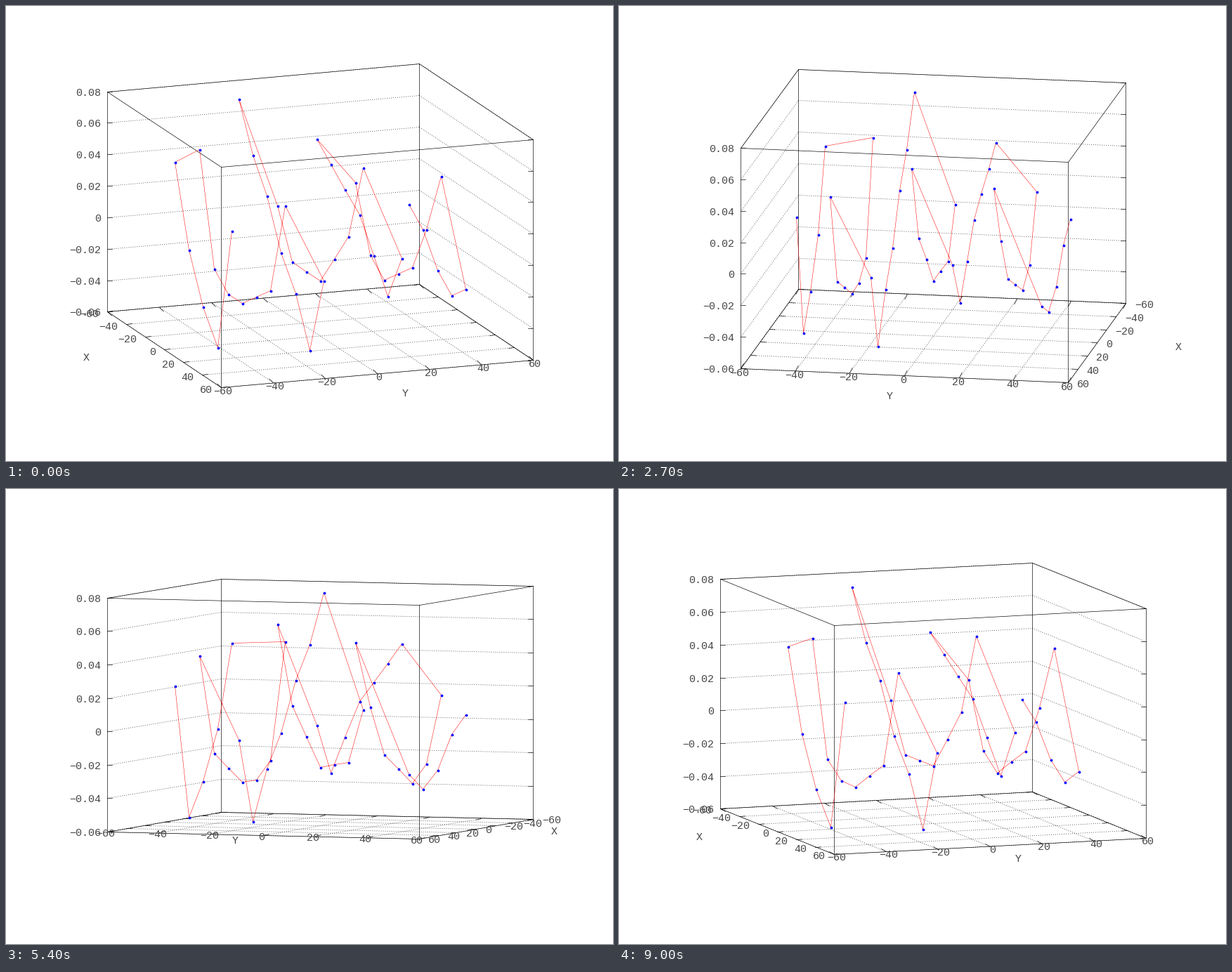
A matplotlib script that plays this animation: 864x648 px, repeating every 9900 ms.

```python
import numpy as np
import matplotlib.pyplot as plt
from matplotlib.animation import FuncAnimation

W, H, DPI = 864, 648, 100
PT = 72 / DPI                       # points per pixel
CX, CY = 447, 312.6                 # centre of the cube on stage
SX, SY = 236.4, 167                 # half sizes of the cube in pixels
EM = 15                             # font size in pixels
ADV = 0.6 * EM                      # advance of one character

# Camera stops: step, tilt and turn in degrees.
STOPS = [(0, 70, 70), (4, 70, 110), (6, 85, 110),
         (7, 85, 90), (9, 85, 70), (11, 70, 70)]
STEPS = STOPS[-1][0]

# One sweep per row: first, lowest and last height, bend of the fall.
SWEEPS = [(5, -35, -25, 1), (55, -33, 19, 2), (45, -25, 5, 0.7),
          (64, -30, 5, 2.2), (75, -55, -5, 1), (40, -34, 45, 4),
          (45, -55, 25, 1.5)]
PITCH, RADIUS = 15, 55

XY_TICKS = range(-60, 61, 20)
Z_TICKS = [k * 0.02 for k in range(-3, 5)]


def camera(step):
    """Even whole-degree steps between the stops."""
    for (s0, *a), (s1, *b) in zip(STOPS, STOPS[1:]):
        if step < s1:
            f = (step - s0) / (s1 - s0)
            return [p + int((q - p) * f) for p, q in zip(a, b)]


def unit_z(z):
    return (z - 0.01) / 0.07


def height(k, last, dip, first, low, end, bend):
    """Fall to the dip, then hook up; heights come in steps of ten."""
    if k <= dip:
        z = low + (first - low) * (1 - k / dip) ** bend
    else:
        z = low + (end - low) * ((k - dip) / (last - dip)) ** 2.5
    return (10 * np.floor(z / 10) + 5) / 1000


def scan_points():
    """Serpentine scan over a round field, in cube units."""
    pts = []
    for row, sweep in enumerate(SWEEPS):
        y = PITCH * (3 - row)
        xs = [x for x in range(-45, 46, PITCH) if np.hypot(x, y) < RADIUS]
        back = row % 2
        last = len(xs) - 1
        for k, x in enumerate(xs[::-1] if back else xs):
            z = height(k, last, last - 1 - back, *sweep)
            pts.append((x / 60, y / 60, unit_z(z)))
    return np.array(pts)


POINTS = scan_points()
fig = plt.figure(figsize=(W / DPI, H / DPI), dpi=DPI, facecolor="white")
ax = fig.add_axes([0, 0, 1, 1])


def projector(tilt, turn):
    ct, st = np.cos(np.radians(tilt)), np.sin(np.radians(tilt))
    cz, sz = np.cos(np.radians(turn)), np.sin(np.radians(turn))

    def project(x, y, z):
        return np.rint([CX + SX * (x * cz + y * sz),
                        CY + SY * ((x * sz - y * cz) * ct - z * st)])

    ux, uy = np.array([cz, sz * ct]), np.array([sz, -cz * ct])
    return project, ux / np.hypot(*ux), uy / np.hypot(*uy)


def line(*pts, color="black", width=0.65, z=2, **kw):
    xs, ys = np.array(pts).T
    ax.plot(xs, ys, color=color, lw=width * PT, zorder=z, snap=False, **kw)


def grid(*pts):
    line(*pts, color="#444444", width=0.8, z=1,
         dashes=(1.25, 2.5), dash_capstyle="butt")


def label(text, pos, align=0):
    """align: -1 ends at pos, 0 is centred, 1 starts at pos."""
    text = str(text).replace("-", "\u2212")
    ax.text(pos[0] + align * len(text) * ADV / 2, pos[1] + 0.32 * EM, text,
            family="Liberation Mono", fontsize=EM * PT, color="#484848",
            ha="center", va="baseline", zorder=3)


def draw_box(p):
    for a in (-1, 1):
        for b in (-1, 1):
            line(p(-1, a, b), p(1, a, b))
            line(p(a, -1, b), p(a, 1, b))
            line(p(a, b, -1), p(a, b, 1))


def draw_axes(p, ux, uy, side):
    down = np.array([0, 0.7])
    for v in XY_TICKS:
        u = v / 60
        near, far = p(u, side, -1), p(u, -side, -1)
        grid(near, far)
        line(near, near - side * 8 * uy)
        line(far, far + side * 8 * uy)
        label(v, near + side * 12.5 * uy + down, side)

        near, far = p(1, u, -1), p(-1, u, -1)
        grid(near, far)
        line(near, near - 8 * ux)
        line(far, far + 8 * ux)
        label(v, near + ux * (3.3, 5.5) + down)

    for v in Z_TICKS:
        h = unit_z(v)
        left, back, right = p(side, -1, h), p(-1, -side, h), p(-side, 1, h)
        grid(left, back)
        grid(back, right)
        line(left, left + (7, 0))
        line(right, right - (7, 0))
        label(f"{v:.2f}" if v else "0", left + (-9.7, 0.7), -1)

    label("X", p(0, 1.5 * side, -1) + (0, 1))
    label("Y", p(1.5, 0, -1) + (0, 1))


def update(step):
    tilt, turn = camera(step)
    p, ux, uy = projector(tilt, turn)
    ax.clear()
    ax.set_xlim(-0.5, W - 0.5)
    ax.set_ylim(H - 0.5, -0.5)
    ax.axis("off")
    draw_box(p)
    draw_axes(p, ux, uy, -1 if turn < 90 else 1)
    xs, ys = p(*POINTS.T)
    line(*zip(xs, ys), color="red", width=0.5, z=4)
    ax.plot(xs, ys, "o", color="blue", ms=3.8 * PT, mew=0, zorder=5,
            snap=False)
    return ax.get_children()


anim = FuncAnimation(fig, update, frames=STEPS, init_func=lambda: [],
                     interval=900, repeat=True, repeat_delay=0, blit=False)
plt.show()
```
